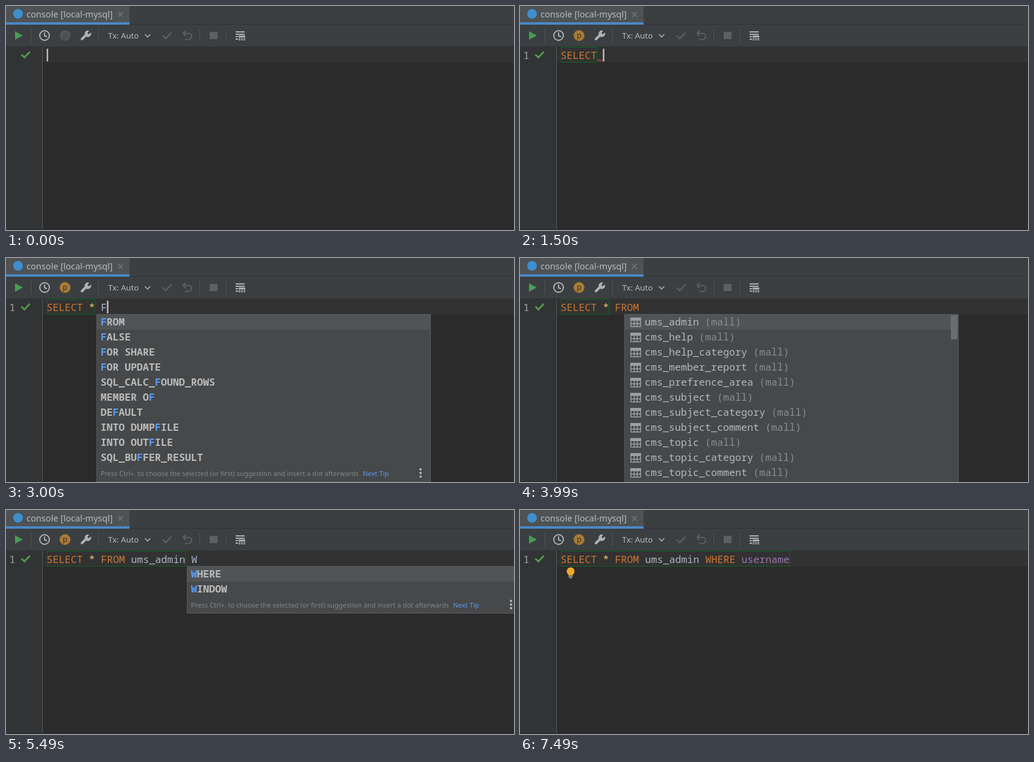
Write an HTML page that moves like this. It is 843x372 px and loops after 7.99 s.

```html
<!DOCTYPE html>
<html lang="en">
<head>
<meta charset="utf-8">
<title>SQL console completion</title>
<style>
  html, body { margin: 0; width: 100%; height: 100%; overflow: hidden; background: #2b2b2b; }
  svg { display: block; width: 100%; height: 100%; }
  text { white-space: pre; font-family: "Noto Sans", sans-serif; fill: #bbb; }
  .mono { font: 16.667px "Noto Sans Mono", "DejaVu Sans Mono", monospace; fill: #b4b9be; }
  .bold { font-weight: 600; fill: #bbb; }
  .tail { fill: #8b8d8f; }
  .match { fill: #589df6; }
  .hint { font-size: 11.12px; fill: #85888a; }
  .line { fill: none; stroke: #afb1b3; stroke-width: 2; }
  .off { stroke: #5d6062; stroke-width: 2.4; }
</style>
</head>
<body>
<svg viewBox="0 0 843 372">
  <rect width="843" height="68" fill="#3c3f41"/>
  <rect y="30" width="843" height="1" fill="#323436"/>
  <rect width="205" height="27" fill="#4e5254"/>
  <rect y="27" width="205" height="4" fill="#4a88c7"/>
  <circle cx="20" cy="13" r="8" fill="#3e8fcf"/>
  <text x="34" y="19" font-size="14.6">console [local-mysql]</text>
  <path class="line" d="M186 10l8 8m0-8l-8 8" style="stroke:#777a7c;stroke-width:1.2"/>

  <path d="M41.500 38v22M153.500 38v22M321.500 38v22M365.500 38v22" stroke="#515355"/>
  <path d="M15 42l13 7-13 7z" fill="#499c54"/>
  <circle class="line" cx="64" cy="49" r="8"/>
  <path class="line" d="M64 44v5.500l4 1.500"/>
  <path d="M126 55l8-8" stroke="#afb1b3" stroke-width="4" stroke-linecap="round"/>
  <path d="M138 41l-3 4 2 2 4-3a5.500 5.500 0 1 1-3-3z" fill="#afb1b3"/>
  <text x="169.500" y="54" font-size="13.3">Tx: Auto</text>
  <path class="line" d="M230.500 47l4.500 4.500 4.500-4.500" style="stroke-width:1.6"/>
  <path class="line off" d="M260 49l5 5 9.500-10"/>
  <path class="line off" d="M298 41l-4 4.500 4 4.500M295 45.500h8a5 5 0 0 1 0 10h-6" style="stroke-width:2"/>
  <rect x="338" y="43" width="13" height="12" fill="#5d6062"/>
  <path d="M381 43h15M381 47h15M381 51h4M381 55h4" stroke="#afb1b3" stroke-width="2"/>
  <path d="M386 49h11v8h-11z" fill="#afb1b3"/>
  <path d="M386 52.500h11M386 55h11M389.500 52v5M393.500 52v5" stroke="#3c3f41"/>

  <rect y="67" width="843" height="1" fill="#323436"/>
  <rect y="68" width="843" height="304" fill="#2b2b2b"/>
  <rect y="68" width="60" height="304" fill="#313335"/>
  <rect x="61" y="68" width="782" height="26" fill="#323232"/>
  <rect x="60" y="68" width="1" height="304" fill="#555759"/>
  <rect y="371" width="843" height="1" fill="#282829"/>
  <path d="M25.500 80.500l5 5 9-9.500" fill="none" stroke="#4f9a45" stroke-width="3"/>
  <g id="scene"></g>
</svg>
<script>
const LOOP = 7990, CHAR = 10, ROW = 25, POPUP_WIDTH = 555;
const scene = document.getElementById('scene');

const rect = (x, y, w, h, fill, more = '') =>
  `<rect x="${x}" y="${y}" width="${w}" height="${h}" fill="${fill}" ${more}/>`;
const text = (x, y, content, cls = 'mono', more = '') =>
  `<text x="${x}" y="${y}" class="${cls}" ${more}>${content}</text>`;

const tokenColor = token =>
  /^(SELECT|FROM|WHERE)$/.test(token) ? '#cc7832' :
  token === '*' ? '#ffc66d' :
  token === 'username' ? '#9876aa' : '#a9b7c6';

const codeLine = code => code.split(/( )/)
  .map(token => `<tspan fill="${tokenColor(token)}">${token}</tspan>`).join('');

function frame(x, height) {
  return rect(x + .5, 93.5, POPUP_WIDTH - 1, height, '#46484a', 'stroke="#57595b"') +
    rect(x + 1, 94, POPUP_WIDTH - 2, ROW, '#515457');
}

const scrollbar = (x, h) => rect(x + POPUP_WIDTH - 13, 95, 11, h, '#6b6d6f');

function keywordPopup(x, letter, words, hasHint) {
  const rows = words.map((word, i) => {
    const marked = word.replace(letter, `<tspan class="match">${letter}</tspan>`);
    return text(x + 7, 112 + i * ROW, marked, 'mono bold');
  }).join('');
  const bottom = 94 + words.length * ROW;
  const dots = [7, 13, 19].map(dy =>
    `<circle cx="${x + 538}" cy="${bottom + dy}" r="1.9" fill="#bbb"/>`).join('');
  const hint = text(x + 7, bottom + 18,
    'Press Ctrl+. to choose the selected (or first) suggestion and insert a dot afterwards', 'hint') +
    text(x + 442, bottom + 18, 'Next Tip', 'hint match', 'style="fill:#589df6"') + dots;
  return frame(x, hasHint ? bottom - 66 : 290) + rows + (hasHint ? hint : scrollbar(x, 68));
}

function columnIcon(x, y, isKey) {
  const key = `<circle cx="${x + 3}" cy="${y + 15}" r="3" fill="#9aa0a5"/>
    <path d="M${x + 15} ${y + 8}v9m0-2h3" stroke="#c9824a" stroke-width="2"/>
    <circle cx="${x + 15}" cy="${y + 7}" r="3" fill="none" stroke="#c9824a" stroke-width="2"/>`;
  return rect(x, y, 8, 16, '#9aa0a5') +
    `<path d="M${x + 9} ${y + 1}h9v14h-9M${x + 9} ${y + 5.5}h9m-9 5h9M${x + 13} ${y}v15"
      fill="none" stroke="#9aa0a5" stroke-width="1.5"/>` + (isKey ? key : '');
}

const tableIcon = (x, y) => rect(x, y, 18, 5, '#9aa0a5') +
  `<path d="M${x + 1} ${y + 5}v10h16v-10M${x} ${y + 10}h18M${x + 6.500} ${y + 5}v10m5-10v10"
    fill="none" stroke="#9aa0a5" stroke-width="1.5"/>`;

// Each entry reads "name type"; a bare upper-case name is a keyword.
function namePopup(x, entries, owner, icon) {
  return frame(x, 290) + entries.map((entry, i) => {
    const [name, type = ''] = entry.split(' '), y = 112 + i * ROW;
    if (name === 'NOT') return text(x + 34, y, name, 'mono bold');
    return icon(x + 10, y - 13, name === 'id') +
      text(x + 34, y, `${name} <tspan class="tail">(${owner})</tspan>`) +
      text(x + 541, y, type, 'mono tail', 'text-anchor="end"');
  }).join('');
}

const startWords = ['SELECT', 'SAVEPOINT', 'SET', 'SET PASSWORD', 'SHOW', 'SHUTDOWN',
  'START GROUP_REPLICATION', 'START SLAVE', 'START TRANSACTION', 'STOP GROUP_REPLICATION', 'STOP SLAVE'];
const fromWords = ['FROM', 'FALSE', 'FOR SHARE', 'FOR UPDATE', 'SQL_CALC_FOUND_ROWS', 'MEMBER OF',
  'DEFAULT', 'INTO DUMPFILE', 'INTO OUTFILE', 'SQL_BUFFER_RESULT'];
const tables = ['ums_admin', 'cms_help', 'cms_help_category', 'cms_member_report', 'cms_prefrence_area',
  'cms_subject', 'cms_subject_category', 'cms_subject_comment', 'cms_topic', 'cms_topic_category',
  'cms_topic_comment'];
const columns = ['username varchar', 'id bigint', 'create_time datetime', 'status int', 'icon varchar',
  'email varchar', 'login_time datetime', 'nick_name varchar', 'note varchar', 'NOT', 'password varchar'];

const selectAll = 'SELECT *', fromTable = selectAll + ' FROM ums_admin';
const tablePopup = namePopup(173, tables, 'mall', tableIcon) + scrollbar(173, 40);
const wherePopup = keywordPopup(300, 'W', ['WHERE', 'WINDOW'], true);
const columnPopup = namePopup(333, columns, 'mall.ums_admin', columnIcon);

// "box" is the length in characters of the outlined statement.
const states = [
  { at: 0, code: '' },
  { at: 500, code: 'S', popup: keywordPopup(60, 'S', startWords) },
  { at: 1500, code: 'SELECT ', box: 6, error: true },
  { at: 2000, code: selectAll, box: 6, error: true },
  { at: 2500, code: selectAll + ' F', box: 8 },
  { at: 3000, code: selectAll + ' F', box: 8, popup: keywordPopup(150, 'F', fromWords, true) },
  { at: 3510, code: selectAll + ' FROM ', box: 8, popup: tablePopup },
  { at: 3990, code: selectAll + ' FROM ', box: 8, popup: tablePopup, blink: true },
  { at: 4510, code: fromTable, box: 23 },
  { at: 4990, code: fromTable + ' W', box: 23, popup: wherePopup },
  { at: 5490, code: fromTable + ' W', box: 23, popup: wherePopup, blink: true },
  { at: 5990, code: fromTable + ' WHERE ', box: 23, popup: columnPopup },
  { at: 6490, code: fromTable + ' WHERE ', box: 23, popup: columnPopup, blink: true },
  { at: 6990, code: fromTable + ' WHERE username', box: 38 },
  { at: 7490, code: fromTable + ' WHERE username', box: 38, blink: true, bulb: true },
];

const bulb = `<path d="M80.500 108.500q0-1.500-1.500-2.500a6.500 6.500 0 1 1 10 0q-1.500 1-1.500 2.500z" fill="#f4a62a"/>
  <path d="M80.500 110h7m-6 2.500h5" stroke="#b5b7b9" stroke-width="1.5"/>`;
const squiggle = '<path d="M128 90.500l2-1.500 3 2.500 3-2.500 2 2" fill="none" stroke="#c7403c" stroke-width="1.2"/>';

function draw({ at, code, box, error, popup, blink, bulb: hasBulb }) {
  const active = at >= 1500;
  return `<circle cx="98" cy="49" r="9" fill="${active ? '#a87b35' : '#525557'}"/>` +
    text(98, 53, 'p', '', `text-anchor="middle" font-size="13" style="fill:${active ? '#36322a' : '#45484a'}"`) +
    (code ? text(5.5, 87.5, '1', 'mono', 'style="fill:#a4a3a3"') : '') +
    (box ? rect(68.5, 68.5, box * CHAR - 1, 25, 'none', 'stroke="#0b6420"') : '') +
    text(67.5, 87.5, codeLine(code)) +
    (error ? squiggle : '') +
    (blink ? '' : rect(67.5 + code.length * CHAR, 71, 2.5, 21, '#bbb')) +
    (popup || '') + (hasBulb ? bulb : '');
}

let shown;
function tick(now) {
  const t = now % LOOP;
  const state = states.findLast(s => s.at <= t) || states[0];
  if (state !== shown) scene.innerHTML = draw(shown = state);
  requestAnimationFrame(tick);
}
tick(performance.now());
</script>
</body>
</html>
```
